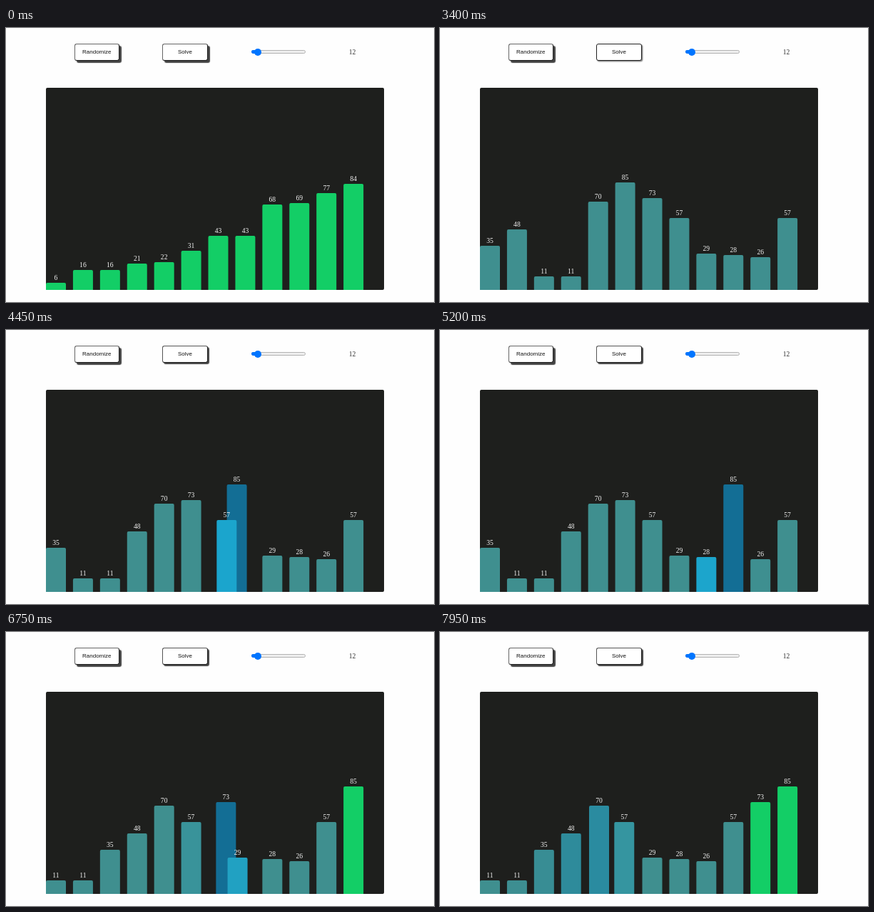
An HTML page for the animation above (8000 ms loop, 600 by 385 pixels).

```html
<!DOCTYPE html>
<html lang="en">
<head>
<meta charset="utf-8">
<title>Bubble sort</title>
<style>
html, body { margin: 0; width: 100%; height: 100%; overflow: hidden; background: #fefefe; }
#stage { position: relative; width: 600px; height: 385px; overflow: hidden; }
#stage div { position: absolute; box-sizing: border-box; }
#stage .btn {
  top: 22px; width: 63.5px; height: 24px;
  border: 1.2px solid; border-color: #666 #222 #222 #666; border-radius: 3px;
  background: #fff; box-shadow: 3px 3px 1px #444;
  font: 8px/21.6px "Liberation Sans", Arial, sans-serif; color: #111; text-align: center;
}
#stage .btn.hover { border-color: #555 #222 #222 #555; box-shadow: 2px 2px 1px #444; }
#stage .btn.down { border-color: #222; box-shadow: 1.2px 1.2px 1.5px #777; }
#track {
  left: 343.8px; top: 31.4px; width: 76px; height: 4.8px;
  border: .6px solid #b2b2b2; border-radius: 2.4px; background: #efefef;
}
#fill { left: 343.8px; top: 31.4px; width: 9px; height: 4.8px; border-radius: 2.4px; background: #0075ff; }
#thumb { left: 348.3px; top: 29px; width: 9.6px; height: 9.6px; border-radius: 50%; background: #0075ff; }
#count, .bar span { font: 9.6px/10px "Liberation Serif", "Times New Roman", serif; text-align: center; }
#count { left: 470px; top: 29px; width: 31px; color: #333; }
#panel { left: 55.8px; top: 83.7px; width: 474.2px; height: 284.8px; border-radius: 2px; background: #1e1f1d; }
.bar { left: 0; bottom: 0; width: 28.4px; border-radius: 2px 2px 0 0; }
.bar span { position: absolute; left: 0; top: -12px; width: 100%; color: #f2f2f2; }
</style>
</head>
<body>
<div id="stage">
  <div class="btn" id="rand" style="left:95.5px">Randomize</div>
  <div class="btn" id="solve" style="left:219.3px">Solve</div>
  <div id="track"></div><div id="fill"></div><div id="thumb"></div>
  <div id="count">12</div>
  <div id="panel"></div>
</div>
<script>
const LOOP = 8000, PITCH = 37.92, UNIT = 1.778;
const SHUFFLE = 2200, SORT = 3415, COMPARE = 24, SWAP = 285, LEAD = 8, MOVE = 250, FADE = 110;
const GREEN = [19, 206, 102], TEAL = [63, 143, 143], DARK = [19, 110, 149], LIGHT = [27, 165, 205];
const sorted = [6, 16, 16, 21, 22, 31, 43, 43, 68, 69, 77, 84];
const shuffled = [35, 48, 11, 11, 70, 85, 73, 57, 29, 28, 26, 57];
const $ = id => document.getElementById(id);

// cubic-bezier(.25, .1, .25, 1)
function ease(p) {
  if (p <= 0) return 0;
  if (p >= 1) return 1;
  const curve = (a, b, s) => 3 * a * s * (1 - s) ** 2 + 3 * b * s * s * (1 - s) + s ** 3;
  let lo = 0, hi = 1;
  for (let i = 0; i < 24; i++) {
    const mid = (lo + hi) / 2;
    if (curve(.25, .25, mid) < p) lo = mid; else hi = mid;
  }
  return curve(.1, 1, lo);
}

// A value that eases to each new target, like a CSS transition
class Track {
  constructor(value) { this.keys = [{ t: -1e4, from: value, to: value, d: 1 }]; }
  key(t) { return this.keys.findLast(k => k.t <= t); }
  at(t) {
    const k = this.key(t), e = ease((t - k.t) / k.d);
    return k.from.map((v, i) => v + (k.to[i] - v) * e);
  }
  set(t, to, d) {
    if (String(this.keys.at(-1).to) !== String(to)) this.keys.push({ t, from: this.at(t), to, d });
  }
}

const bars = shuffled.map((value, i) => {
  const el = document.createElement("div"), label = document.createElement("span");
  el.className = "bar";
  el.append(label);
  $("panel").append(el);
  const bar = {
    el, label, value, first: sorted[i],
    x: new Track([i]), h: new Track([sorted[i]]), color: new Track(GREEN)
  };
  bar.h.set(SHUFFLE, [value], MOVE);
  bar.color.set(SHUFFLE, TEAL, MOVE);
  return bar;
});

function planSort() {
  const row = [...bars];
  let t = SORT;
  for (let end = row.length - 1; end > 0; end--) {
    for (let i = 0; i < end; i++) {
      const a = row[i], b = row[i + 1];
      a.color.set(t, DARK, FADE);
      b.color.set(t, LIGHT, FADE);
      const swap = a.value > b.value;
      if (swap) {
        a.x.set(t + LEAD, [i + 1], MOVE);
        b.x.set(t + LEAD, [i], MOVE);
        [row[i], row[i + 1]] = [b, a];
      }
      t += swap ? SWAP : COMPARE;
      if (t > LOOP) return;
      row[i].color.set(t, TEAL, FADE);
      // The right bar keeps its colour if the next comparison takes it
      if (i + 1 === end) row[end].color.set(t, GREEN, FADE);
    }
  }
}
planSort();

function press(id, t, enter, down, up, leave) {
  $(id).className = "btn" + (t >= down && t < up ? " down" : t >= enter && t < leave ? " hover" : "");
}

function draw(t) {
  press("rand", t, 1700, 2050, 2200, 2800);
  press("solve", t, 2800, 3050, 3430, LOOP);
  for (const b of bars) {
    const s = b.el.style;
    s.height = b.h.at(t)[0] * UNIT + "px";
    s.transform = `translateX(${b.x.at(t)[0] * PITCH}px)`;
    s.background = `rgb(${b.color.at(t).map(Math.round)})`;
    s.zIndex = b.color.key(t).to === LIGHT ? 1 : 0;
    const text = String(t < SHUFFLE ? b.first : b.value);
    if (b.label.textContent !== text) b.label.textContent = text;
  }
}

const start = performance.now();
function tick() {
  draw((performance.now() - start) % LOOP);
  requestAnimationFrame(tick);
}
tick();
</script>
</body>
</html>
```
